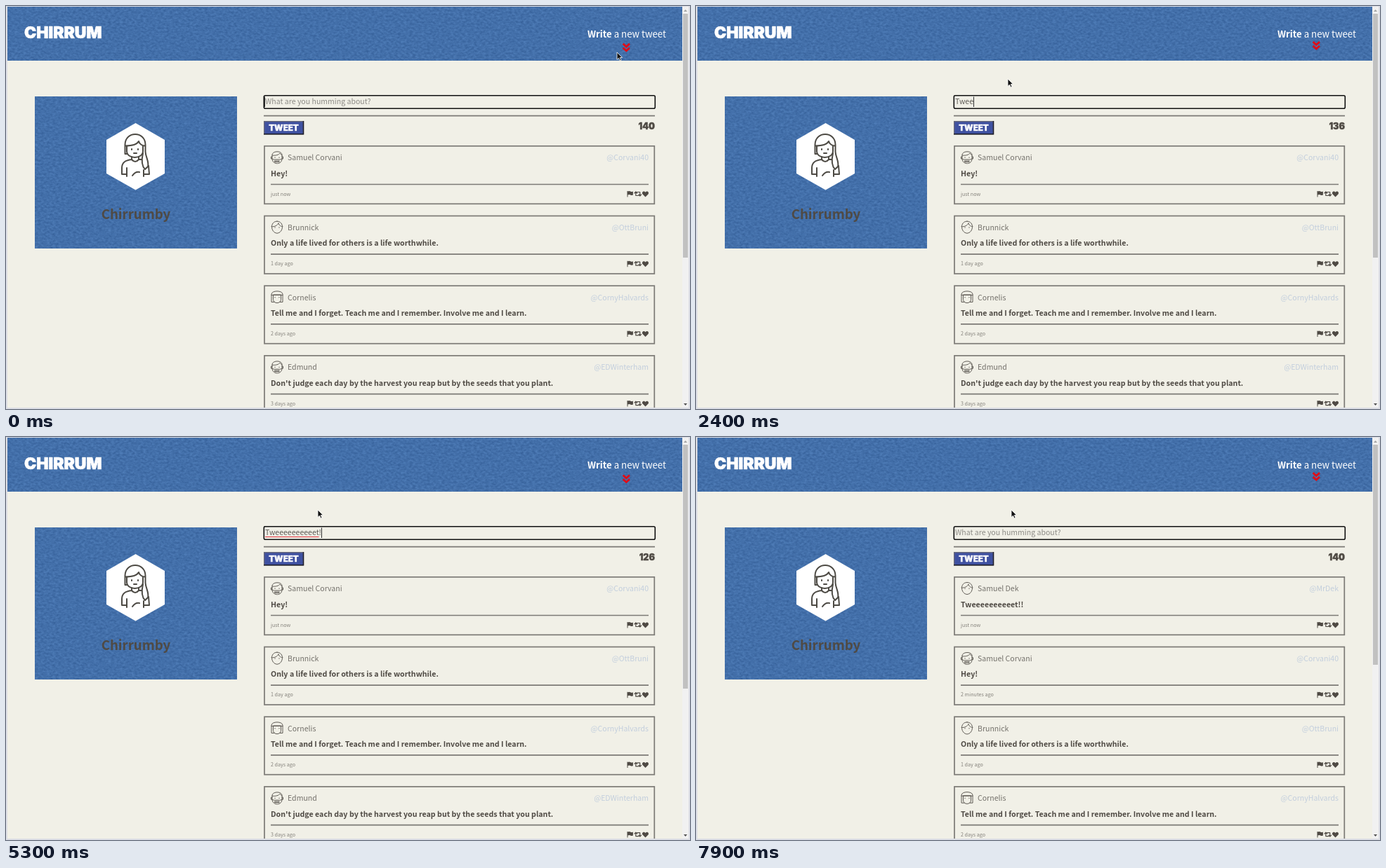
An HTML page that plays this animation: 974 px wide and 575 px high, repeating every 8 s.

```html
<!DOCTYPE html>
<html lang="en">
<head>
<meta charset="utf-8">
<style>
html, body { margin: 0; width: 100%; height: 100%; overflow: hidden; background: #f1f0e7; }
svg { position: absolute; left: 0; top: 0; will-change: transform; }
text { font: 300 10.55px "Noto Sans CJK JP", "Noto Sans CJK SC", "Noto Sans", sans-serif; fill: #74716b; white-space: pre; }
.block { font-family: Inter, Roboto, sans-serif; font-weight: 900; stroke-width: .7; }
.white { fill: #fff; }
.logo { font-size: 23px; stroke: #fff; }
.button { font-size: 11.6px; stroke: #fff; stroke-width: .4; }
.count { font-size: 12.6px; fill: #4f4a44; stroke: #4f4a44; stroke-width: .4; }
.write { font-size: 13.2px; fill: #fff; }
.write tspan, .body, .title { font-weight: 700; }
.body, .title { fill: #4f4a44; }
.body { font-size: 10.65px; }
.title { font-size: 18.7px; }
.time { font-size: 7.2px; fill: #85827c; }
.handle { fill: #c2cedd; }
.hint { fill: #8d8b86; }
.end { text-anchor: end; }
.mid { text-anchor: middle; }
.line { fill: none; stroke: #5c5852; stroke-linecap: round; stroke-linejoin: round; }
.rule { fill: none; stroke: #7c7a76; stroke-width: 1.7; }
.ink { fill: #4f4a44; }
</style>
</head>
<body>
<svg width="974" height="575">
  <filter id="leather" x="0" y="0" width="1" height="1" color-interpolation-filters="sRGB">
    <feTurbulence type="fractalNoise" baseFrequency=".24 .36" numOctaves="3" seed="7"/>
    <feColorMatrix values=".14 0 0 0 .193  .16 0 0 0 .357  .17 0 0 0 .58  0 0 0 0 1"/>
  </filter>
  <rect x="2" y="1" width="961" height="77" filter="url(#leather)"/>
  <rect x="41" y="129" width="288" height="217" filter="url(#leather)"/>
</svg>
<svg width="974" height="575">
  <text class="block white logo" x="26" y="45.5">CHIRRUM</text>
  <text class="write end" x="940" y="45"><tspan>Write</tspan> a new tweet</text>
  <g id="chevrons" fill="none" stroke="#df0d18" stroke-width="2.8">
    <path d="M878.600-5.200l4.700 4.200 4.700-4.200M878.600.6l4.700 4.200 4.700-4.200"/>
  </g>

  <path class="white" d="M184.5 167L226 191V239L184.5 262.500 143 239V191Z"/>
  <g class="line" stroke-width="2" style="stroke:#4d4a44">
    <path d="M172 211H169.500V198C169.500 178 198.500 178 198.500 198V208C199 216 204 222 202 229L198 233C193 228 193 219 195 210"/>
    <path d="M170 199.500C180 199.500 187 197 189 193C190 197 194 199.500 198 199.500M172 200V207C172 219 195 219 195 207V200"/>
    <path d="M179 204v1M188 204v1M182 210h4"/>
    <path d="M179 215V219C170 220 165 223 165 231V240H172M172 231V243M189 215V219H193M179 219Q184 225 189 219M196 234V243M203 228L204 240H197M180 242Q184 236 190 237"/>
  </g>
  <text class="title mid" x="185" y="304">Chirrumby</text>

  <rect x="367.300" y="127.700" width="557" height="18.600" rx="2" fill="none" stroke="#111" stroke-width="1.600"/>
  <text id="hint" class="hint" x="369" y="140.300">What are you humming about?</text>
  <text id="typed" x="369" y="140.300" style="fill:#5f5c57"></text>
  <path id="spell" stroke="#e0323a"/>
  <path id="caret" stroke="#333"/>
  <path class="rule" d="M367 156.700H924"/>
  <rect x="367.700" y="164.700" width="55.800" height="18" fill="#3f51a1" stroke="#67687a" stroke-width="1.400"/>
  <path d="M367 182.700H423.500V164" fill="none" stroke="#1d1d28" stroke-width="1.400"/>
  <text class="block white button mid" x="395.500" y="178">TWEET</text>
  <text id="count" class="block count end" x="924" y="175.800"></text>

  <g id="before"></g>
  <g id="after"></g>

  <path d="M0 0H974V1H2V573H974V575H0Z" fill="#dcdee5"/>
  <rect x="963" y="1" width="9" height="572" fill="#f1f1f1"/>
  <rect x="972" width="2" height="575" fill="#dcdee5"/>
  <rect id="thumb" x="964" y="11" width="7" fill="#c1c1c1"/>
  <path d="M965 8l2.500-3 2.500 3z" fill="#a3a3a3"/>
  <path d="M965 567l2.500 3 2.500-3z" fill="#505050"/>
  <path id="pointer" d="M0 0V10.500L2.500 8.300 4.200 12 6 11.200 4.300 7.600H7.500Z" fill="#111" stroke="#fff" stroke-width=".8"/>
</svg>
<script>
const $ = id => document.getElementById(id);

const faces = {
  beard: 'M-7-3C-8-10 8-10 7-3V2C7 11-7 11-7 2ZM-7-3C-2-2 3-4 4-6L7-3M-7 2C-4 4-3 3 0 3S4 4 7 2M-3 5H3V6.500H-3ZM-7-1H-8.500V2H-7M7-1H8.500V2H7',
  smooth: 'M0-8.500C11-8.500 9 8 0 8.500C-9 8-11-8.500 0-8.500ZM-8-1C-4 0 1-3 2-6C3-2 6-1 8-1',
  long: 'M-4 7H-8V-4C-8-10 8-10 8-4V7H4M-5.500-3V3C-5.500 10 5.500 10 5.500 3V-3ZM-8-3H8'
};

const card = ([face, name, handle, body, time], i) => `
  <g transform="translate(0 ${199.5 + i * 99.7})">
    <rect class="rule" x="368" y=".3" width="555.300" height="82.500"/>
    <path class="line" transform="translate(386 16.500)" d="${faces[face]}M-3 0v.6M3 0v.6"/>
    <text x="401" y="20.700">${name}</text>
    <text class="handle end" x="915" y="20.700">${handle}</text>
    <text class="body" x="377" y="43">${body}</text>
    <path class="rule" d="M377 55H915"/>
    <text class="time" x="377" y="71">${time}</text>
    <path class="ink" d="M884.500 64.500h1v.5q2-1 3.700 0t3.700 0v5q-2 1-3.700 0t-3.700 0v3h-1z"/>
    <path class="line" style="stroke:#4f4a44" stroke-width="1.200" d="M895 67.500l1.800-2 1.800 2M896.800 66v5h4M898.700 66h4v5M901 69.500l1.800 2 1.800-2"/>
    <path class="ink" d="M910.500 73l-4-4c-2-3 2-5.500 4-2.700c2-2.800 6-.3 4 2.700z"/>
  </g>`;

const hello = time => ['beard', 'Samuel Corvani', '@Corvani40', 'Hey!', time];
const posts = [
  ['smooth', 'Brunnick', '@OttBruni', 'Only a life lived for others is a life worthwhile.', '1 day ago'],
  ['long', 'Cornelis', '@CornyHalvards', 'Tell me and I forget. Teach me and I remember. Involve me and I learn.', '2 days ago'],
  ['beard', 'Edmund', '@EDWinterham', "Don't judge each day by the harvest you reap but by the seeds that you plant.", '3 days ago']
];
const message = 'Tweeeeeeeeeet!!';
const fresh = ['smooth', 'Samuel Dek', '@MrDek', message, 'just now'];
$('before').innerHTML = [hello('just now'), ...posts].map(card).join('');
$('after').innerHTML = [fresh, hello('2 minutes ago'), ...posts.slice(0, 2)].map(card).join('');

const keys = [1800, 2100, 2300, 2400, 2700, 2800, 3000, 3200, 3300, 3500, 3700, 3900, 4100, 5300, 5700];
const blinks = [100, 600, 1100, 1800, 4800, 5300, 6300, 7000, 7800];
const passed = (list, t) => list.filter(k => k <= t).length;
const show = (id, on) => $(id).setAttribute('visibility', on ? 'visible' : 'hidden');
const ease = p => (1 - Math.cos(Math.PI * Math.min(1, Math.max(0, p)))) / 2;

// A one-second shake in seven moves: up, down, up, ... and home.
function shake(t) {
  const stops = [0, -1, 1, -1, 1, -1, 1, 0];
  const p = (t < 4000 ? t + 900 : t - 5000) / 1000 * 7;
  if (p < 0 || p >= 7) return 0;
  const i = Math.floor(p);
  return 3.5 * (stops[i] + (stops[i + 1] - stops[i]) * ease(p - i));
}

function draw(t) {
  const n = t < 6500 ? passed(keys, t) : 0;
  const posted = t >= 7200;
  const glide = ease((t - 50) / 600);
  const x = 870 - 431 * glide + 5 * ease((t - 1000) / 200) + 4 * ease((t - 7200) / 200) + ease((t - 7700) / 200);
  const y = 66 + 38 * glide;

  $('typed').textContent = message.slice(0, n);
  $('count').textContent = 140 - n;
  const end = 369 + (n ? $('typed').getComputedTextLength() : 0);
  $('caret').setAttribute('d', `M${Math.round(end) - .5 + (n ? 1 : 0)} 129.500V144`);
  if (n > 13) $('spell').setAttribute('d', `M369 142.500h${$('typed').getSubStringLength(0, 13)}`);
  show('caret', passed(blinks, t) % 2 === 0);
  show('spell', n > 13);
  show('hint', !n);
  show('before', !posted);
  show('after', posted);
  $('thumb').setAttribute('height', posted ? 314 : 348);
  $('chevrons').setAttribute('transform', `translate(0 ${56.3 + shake(t)})`);
  $('pointer').setAttribute('transform', `translate(${x} ${y})`);
}

const start = performance.now();
function tick() {
  const t = (performance.now() - start) % 8000;
  draw(Math.floor(t / 100) * 100);
  requestAnimationFrame(tick);
}
tick();
</script>
</body>
</html>
```
